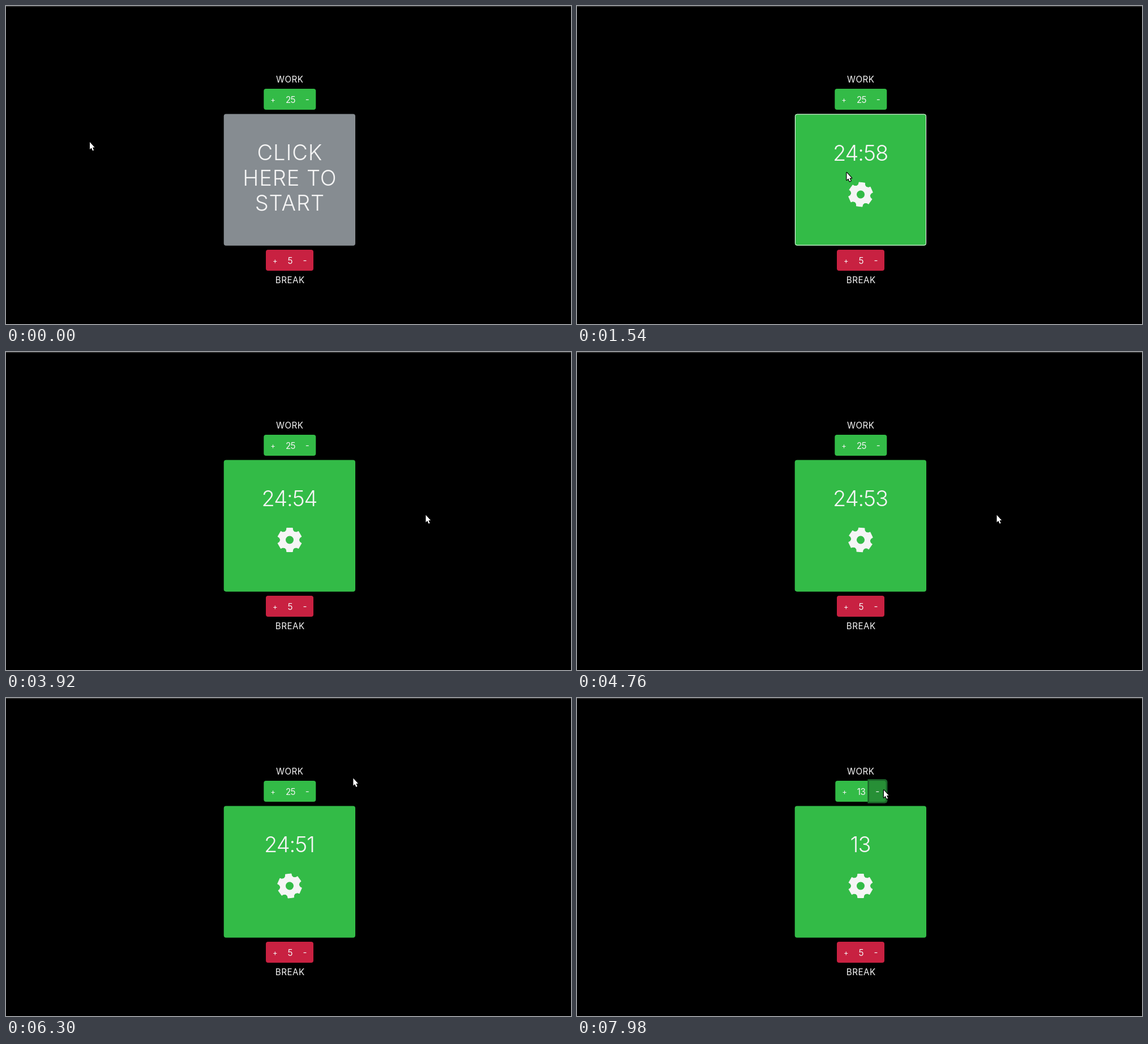
These frames come from a looping animation (998 px wide and 561 px high, 8 s). An HTML page:

```html
<!DOCTYPE html>
<html lang="en">
<head>
<meta charset="utf-8">
<title>Work and break timer</title>
<style>
  html, body { margin: 0; width: 100%; height: 100%; overflow: hidden; background: #000; }
  svg { position: absolute; left: 0; top: 0; display: block; }
  text { font: 400 15.2px Inter, "Open Sans", sans-serif; fill: #f5f5f5; text-anchor: middle; }
  .label { letter-spacing: .5px; }
  .sign { font-size: 13px; }
  .number { letter-spacing: -.6px; }
  .big { font-size: 38px; font-weight: 300; }
  #prompt { letter-spacing: .9px; }
  #clock { letter-spacing: -1.1px; }
  .work { fill: #33bb47; }
  .break { fill: #c82141; }
</style>
</head>
<body>
<svg width="998" height="561" viewBox="0 0 998 561">
  <defs>
    <path id="tooth" d="M-8-14 -5.6-17.5 -5.2-21 5.2-21 5.6-17.5 8-14Z" fill="#f5f5f5" stroke="#f5f5f5" stroke-linejoin="round"/>
  </defs>
  <rect width="998" height="561"/>
  <rect width="998" height="1.5" fill="#333"/>

  <text class="label" x="501.3" y="135">WORK</text>
  <rect id="group" class="work" y="146" height="37" rx="4"/>
  <path id="ring" fill="#1b672a"/>
  <path id="pressed" fill="#278f36"/>
  <text class="sign" id="plus" y="169.5">+</text>
  <text class="number" id="minutes" y="170.5"></text>
  <text id="minus" y="170">-</text>

  <rect id="panel" x="384.7" y="190.5" width="232.3" height="232.2" rx="4"/>
  <rect id="border" x="385.5" y="191" width="231" height="231" rx="3.5" fill="none" stroke="#f5f5f5"/>
  <g id="content">
    <g id="prompt">
      <text class="big" x="501.4" y="272">CLICK</text>
      <text class="big" x="501.4" y="316.5">HERE TO</text>
      <text class="big" x="501.4" y="361">START</text>
    </g>
    <g id="running">
      <text class="big" id="clock" x="500.5" y="272"></text>
      <g id="gear">
        <circle r="12" fill="none" stroke="#f5f5f5" stroke-width="10"/>
      </g>
    </g>
  </g>

  <rect class="break" x="459" y="430" width="84" height="37" rx="4"/>
  <text class="sign" x="475.3" y="453.5">+</text>
  <text x="502" y="454.5">5</text>
  <text x="528" y="454">-</text>
  <text class="label" x="501.8" y="489">BREAK</text>

  <path id="cursor" d="M0 0V13L2.8 10.3 5 15.3 7.1 14.4 5 9.5H8.6Z"
        fill="#fff" stroke="#000" stroke-width="2.4" paint-order="stroke" stroke-linejoin="round"/>
</svg>
<script>
const LOOP = 8000, TICK = 70, SECOND = 700;
const START = 390, STOP = 6690;
const SPIN_PER_TICK = -19.6, UPRIGHT_AT = 3920;

// time, x, y
const route = [
  [0, 148, 240], [40, 148, 240], [370, 476.5, 294],
  [3440, 476.5, 294], [3850, 741.5, 287.5],
  [5150, 741.5, 287.5], [5460, 588.7, 305],
  [5940, 588.7, 305], [6160, 662, 220], [6360, 600, 120], [6580, 542, 162.5]
];

const $ = id => document.getElementById(id);
const show = (id, on) => $(id).setAttribute('visibility', on ? 'visible' : 'hidden');
const set = (id, name, value) => $(id).setAttribute(name, value);
const smooth = p => p * p * (3 - 2 * p);

for (let angle = 0; angle < 360; angle += 60) {
  const tooth = document.createElementNS('http://www.w3.org/2000/svg', 'use');
  tooth.setAttribute('href', '#tooth');
  tooth.setAttribute('transform', `rotate(${angle})`);
  $('gear').append(tooth);
}

function cursorAt(t) {
  const next = route.findIndex(stop => stop[0] > t);
  if (next < 0) return route[route.length - 1].slice(1);
  const [t0, x0, y0] = route[next - 1], [t1, x1, y1] = route[next];
  const p = smooth((t - t0) / (t1 - t0));
  return [x0 + (x1 - x0) * p, y0 + (y1 - y0) * p];
}

function minutesAt(t) {
  if (t < STOP) return 25;
  if (t < 7150) return 24;
  return 23 - Math.max(0, Math.floor((t - 7275) / TICK));
}

// Square on the left, rounded on the right
const tab = (x0, y0, x1, y1, r) =>
  `M${x0} ${y0}H${x1 - r}a${r} ${r} 0 0 1 ${r} ${r}V${y1 - r}a${r} ${r} 0 0 1 ${-r} ${r}H${x0}Z`;

function drawCounter(minutes, hovered, focused) {
  const narrow = minutes < 20;
  const left = narrow ? 456.3 : 455.3;
  const right = narrow ? 545.7 : 547.3;
  const split = narrow ? 516 : 517.5;
  set('group', 'x', left);
  set('group', 'width', right - left);
  set('plus', 'x', left + 16.2);
  set('minus', 'x', right - 15);
  set('minutes', 'x', narrow ? 502 : 502.5);
  $('minutes').textContent = minutes;
  set('ring', 'd', tab(split - 2.7, 143.3, right + 2.7, 185.7, 5));
  set('pressed', 'd', tab(split, 146, right, 183, 4));
  show('ring', focused);
  show('pressed', hovered || focused);
}

function draw(t) {
  const [x, y] = cursorAt(t);
  const started = t >= START, stopped = t >= STOP;
  const overPanel = x > 385 && x < 617 && y > 190 && y < 423;
  const overMinus = x > 517 && x < 547 && y > 146 && y < 183;
  const minutes = minutesAt(t);
  const left = 59 - Math.floor((t - START) / SECOND);
  const angle = stopped ? 0 : (t - UPRIGHT_AT) / TICK * SPIN_PER_TICK;

  set('cursor', 'transform', `translate(${x} ${y})`);
  set('panel', 'fill', started ? '#33bb47' : '#868c91');
  show('border', overPanel);
  set('content', 'transform', `translate(0 ${overPanel ? 1 : 0})`);
  show('prompt', !started);
  show('running', started);
  $('clock').textContent = stopped ? minutes : `24:${left}`;
  set('gear', 'transform', `translate(501 331.5) rotate(${angle})`);
  drawCounter(minutes, overMinus, stopped);
}

const begin = performance.now();
function frame() {
  const t = (performance.now() - begin) % LOOP;
  draw(Math.floor(t / TICK) * TICK);
  requestAnimationFrame(frame);
}
frame();
</script>
</body>
</html>
```
